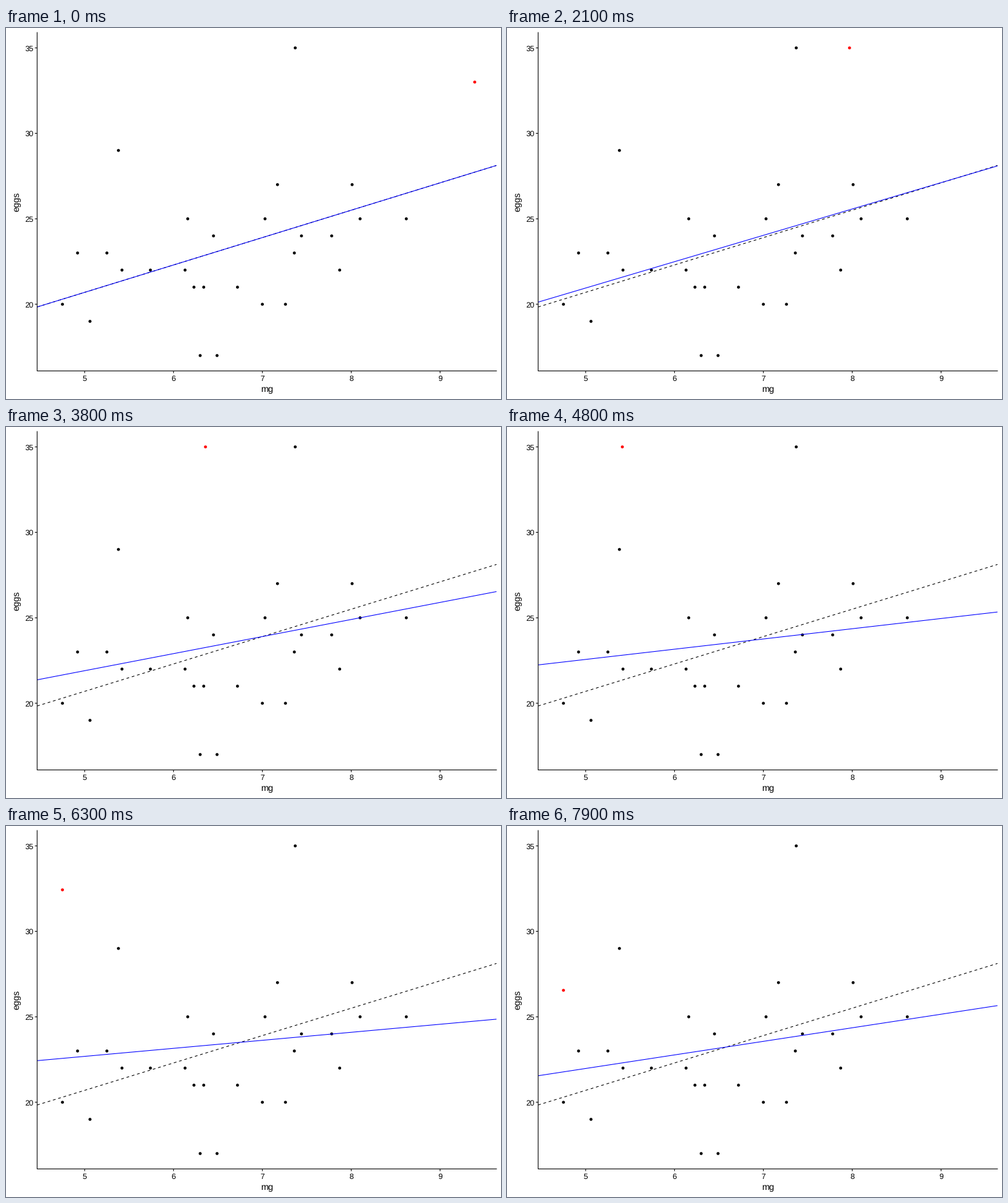
Write a matplotlib script that moves like this. It is 768 px wide and 576 px high and loops after 8000 ms.

```python
import numpy as np
import matplotlib.pyplot as plt
from matplotlib.animation import FuncAnimation
from matplotlib.patches import Circle

plt.rcParams["font.family"] = "Liberation Sans"
plt.rcParams["text.hinting"] = "none"

W, H, DPI = 768, 576, 96
PT = 72 / DPI                      # points per pixel
HALF = 7                           # half a text line, the outer margin
TICK = HALF / 2
LEFT, RIGHT, TOP, BOTTOM = 48.3, W - HALF, HALF, 532.4
LINE = 1.067 * PT


def expand(lo, hi, share=0.05):
    pad = (hi - lo) * share
    return lo - pad, hi + pad


X0, X1 = expand(4.7, 9.4)
Y0, Y1 = expand(17, 35)

# observed doses (mg) for each number of eggs
DOSES = {
    17: [6.30, 6.49],
    19: [5.06],
    20: [4.75, 7.00, 7.26],
    21: [6.23, 6.34, 6.72],
    22: [5.42, 5.74, 6.13, 7.87],
    23: [4.92, 5.25, 7.36],
    24: [6.45, 7.44, 7.78],
    25: [6.16, 7.03, 8.10, 8.62],
    27: [7.17, 8.01],
    29: [5.38],
    35: [7.37],
}
POINTS = [(mg, n) for n, mgs in DOSES.items() for mg in mgs]

# corners of the red point's path, with one step of rest at each turn
START, HIGH, FAR, LOW = (9.39, 33), (9.39, 35), (4.75, 35), (4.75, 17)
STEPS = np.cumsum([0, 5, 1, 49, 1, 49])
PATH_X, PATH_Y = zip(START, HIGH, HIGH, FAR, FAR, LOW)


def px(x):
    return LEFT + (x - X0) / (X1 - X0) * (RIGHT - LEFT)


def py(y):
    return BOTTOM - (y - Y0) / (Y1 - Y0) * (BOTTOM - TOP)


def fit_ends(point):
    """Pixel heights of the least-squares line at both panel edges."""
    xs, ys = np.array(POINTS + [point]).T
    slope, icpt = np.polyfit(xs, ys, 1)
    return [py(icpt + slope * x) for x in (X0, X1)]


fig = plt.figure(figsize=(W / DPI, H / DPI), dpi=DPI, facecolor="white")
ax = fig.add_axes([0, 0, 1, 1])
ax.set_xlim(0, W)
ax.set_ylim(H, 0)
ax.axis("off")


def line(xs, ys, color="black", cap="butt", **kw):
    return ax.plot(xs, ys, color=color, lw=LINE, snap=False,
                   solid_capstyle=cap, dash_capstyle=cap, **kw)[0]


def dot(x, y, color):
    return ax.add_patch(Circle((px(x), py(y)), 2.31, fc=color, lw=0, zorder=1))


def label(x, y, s, size=12, ha="center", rotation=0):
    ax.text(x, y, s, fontsize=size * PT, color="black", ha=ha, va="baseline",
            rotation=rotation, rotation_mode="anchor")


for x, y in POINTS:
    dot(x, y, "black")
red = dot(*START, "red")

edges = [LEFT, RIGHT]
line(edges, fit_ends(START), ls=(0, (4, 4)), zorder=2)
fit = line(edges, fit_ends(START), "blue", zorder=3)

line([LEFT, LEFT, RIGHT], [TOP, BOTTOM, BOTTOM], cap="projecting", zorder=4)
for v in range(5, 10):
    line([px(v)] * 2, [BOTTOM, BOTTOM + TICK])
    label(px(v), 548, str(v))
for v in range(20, 36, 5):
    line([LEFT - TICK, LEFT], [py(v)] * 2)
    label(LEFT - TICK - 2.4, py(v) + 4.5, str(v), ha="right")
label((LEFT + RIGHT) / 2, 565, "mg", 14)
label(20, (TOP + BOTTOM) / 2, "eggs", 14, rotation=90)


def update(i):
    point = np.interp(i, STEPS, PATH_X), np.interp(i, STEPS, PATH_Y)
    red.center = px(point[0]), py(point[1])
    fit.set_ydata(fit_ends(point))
    return red, fit


anim = FuncAnimation(fig, update, frames=80, interval=100,
                     repeat=True, repeat_delay=0)
plt.show()
```
